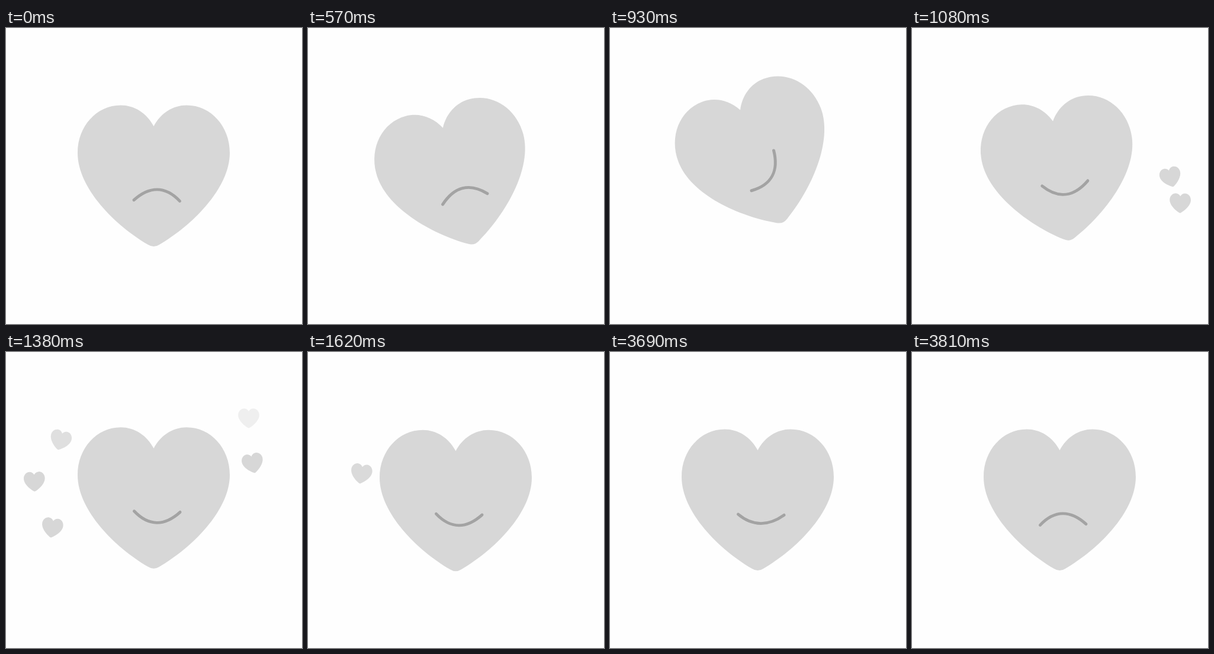
Write an HTML page with a canvas that moves like this. It is 500 px wide and 500 px high and loops after 4530 ms.

```html
<!DOCTYPE html>
<html lang="en">
<head>
<meta charset="utf-8">
<title>Cheering heart</title>
<style>
  html, body { margin: 0; width: 100%; height: 100%; overflow: hidden; background: #fefefe; }
  canvas { display: block; width: 500px; height: 500px; }
</style>
</head>
<body>
<canvas id="stage" width="500" height="500"></canvas>
<script>
const ctx = document.getElementById('stage').getContext('2d');
const LOOP = 4530, STEP = 30;
const CX = 249.5, CY = 250, MOUTH_X = 255, MOUTH_Y = 282.2;

const heart = new Path2D(`M249.5 166 C238 144 217 130.5 194 130.5
  C153 130.5 121 166 121 211 C121 271 185 334 240 366 Q249.5 372 259 366
  C314 334 378 271 378 211 C378 166 346 130.5 305 130.5 C282 130.5 261 144 249.5 166Z`);

// Little hearts: place and tilt at REF, their speed per ms, birth and death
const REF = 1380;
const floaters = [
  { x: 410, y: 112, a: 0,   vx: -.09,  vy: -.467, va: .05,   born: 1005, dies: 1425 },
  { x: 417, y: 188, a: -12, vx: -.12,  vy: -.36,  va: -.045, born: 1050, dies: 1550 },
  { x: 92,  y: 149, a: 15,  vx: .09,   vy: -.45,  va: 0,     born: 1110, dies: 1468 },
  { x: 48,  y: 219, a: -2,  vx: .015,  vy: -.38,  va: 0,     born: 1170, dies: 1550 },
  { x: 78,  y: 297, a: 9,   vx: .05,   vy: -.38,  va: 0,     born: 1230, dies: 1720 }
];

const clamp = v => Math.min(1, Math.max(0, v));
const ease = (from, to, t) => {
  const u = clamp((t - from) / (to - from));
  return u * u * (3 - 2 * u);
};

// Degrees: left, right, left, upright
function tilt(t) {
  if (t <= 510 || t >= 1110) return 0;
  const u = (t - 510) / 150 * Math.PI;
  if (t < 660) return -25.4 * Math.sin(u / 2);
  if (t < 960) return 25.4 * Math.cos(u);
  return -25.4 * Math.cos((t - 960) / 300 * Math.PI);
}

// Jump up, then a damped bounce
function hop(t) {
  if (t < 965) return -35 * ease(735, 965, t);
  if (t >= 2100) return 0;
  const s = t - 1110;
  return 22 * Math.exp(-.0036 * s) * Math.sin(Math.PI * s / 240);
}

function place(x, y, degrees, scale = 1) {
  ctx.translate(x, y);
  ctx.rotate(degrees * Math.PI / 180);
  ctx.scale(scale, scale);
}

function drawMouth(t) {
  const flip = 1 - 2 * ease(3660, 3810, t);
  ctx.save();
  place(MOUTH_X, MOUTH_Y, 180 * (ease(600, 1080, t) - 1));
  const y = v => (v - MOUTH_Y) * flip;
  ctx.beginPath();
  ctx.moveTo(-38.5, y(272));
  ctx.bezierCurveTo(-14, y(298), 13, y(297), 39, y(273.7));
  ctx.lineWidth = 5;
  ctx.lineCap = 'round';
  ctx.strokeStyle = '#a3a3a3';
  ctx.stroke();
  ctx.restore();
}

function drawFloater(f, t) {
  if (t <= f.born || t >= f.dies) return;
  const s = t - REF;
  ctx.save();
  ctx.globalAlpha = clamp((f.dies - t) / 110);
  place(f.x + f.vx * s, f.y + f.vy * s, f.a + f.va * s, .139 * clamp((t - f.born) / 30));
  ctx.translate(-CX, -CY);
  ctx.fill(heart);
  ctx.restore();
}

function draw(t) {
  ctx.fillStyle = '#fefefe';
  ctx.fillRect(0, 0, 500, 500);
  ctx.fillStyle = '#d7d7d7';
  floaters.forEach(f => drawFloater(f, t));
  ctx.save();
  place(CX, CY + hop(t), tilt(t));
  ctx.translate(-CX, -CY);
  ctx.fill(heart);
  drawMouth(t);
  ctx.restore();
}

let start;
function tick(now) {
  start ??= now;
  const t = (now - start) % LOOP;
  draw(Math.floor(t / STEP) * STEP);
  requestAnimationFrame(tick);
}
requestAnimationFrame(tick);
</script>
</body>
</html>
```
